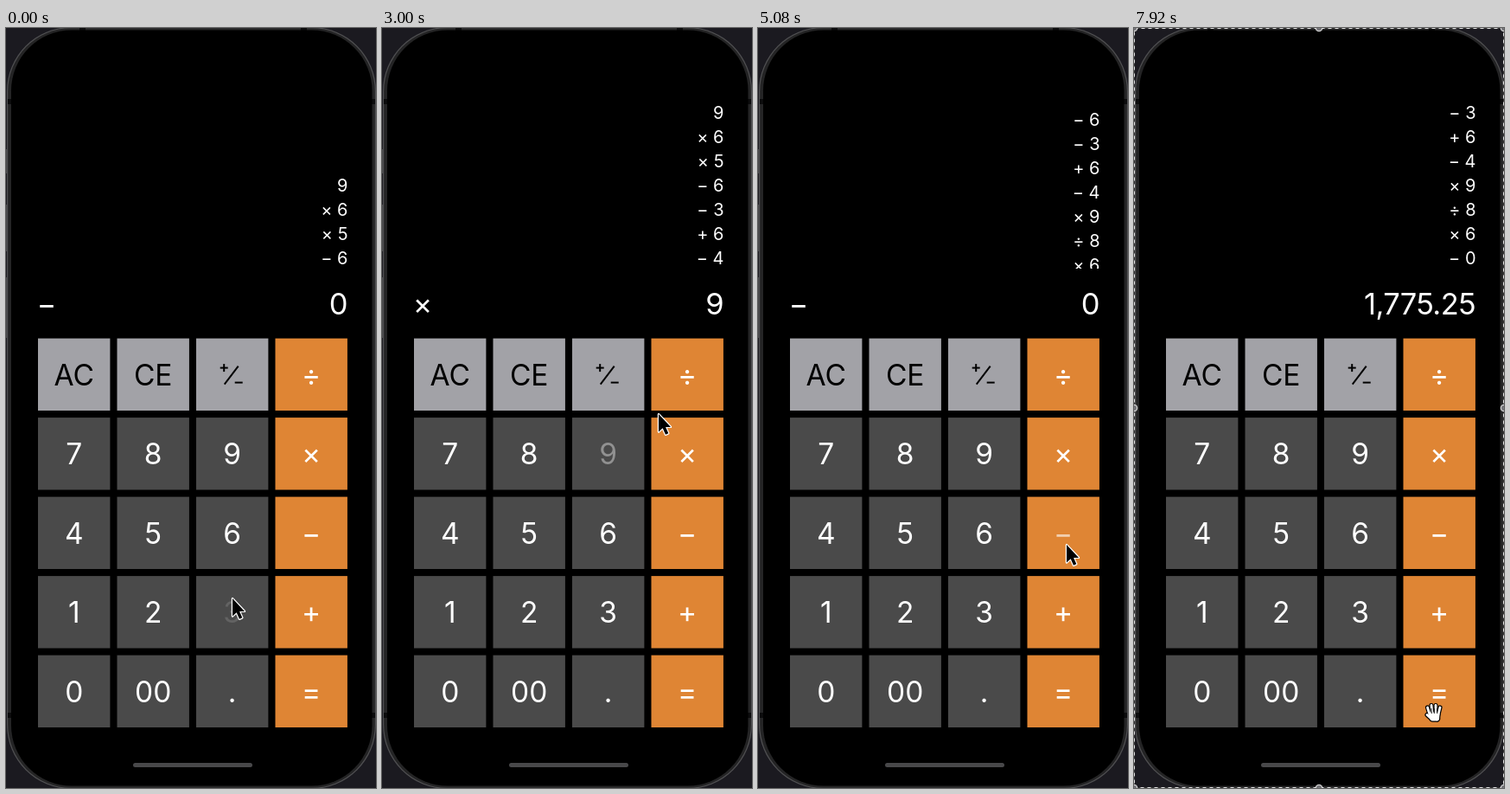
An HTML page with a canvas for the animation above (8010 ms loop, 428 by 878 pixels).

```html
<!DOCTYPE html>
<html lang="en">
<head>
<meta charset="utf-8">
<title>Calculator</title>
<style>
  html, body { margin: 0; width: 100%; height: 100%; overflow: hidden; background: #000; }
  canvas { display: block; }
</style>
</head>
<body>
<canvas id="stage" width="428" height="878"></canvas>
<script>
const W = 428, H = 878, LOOP = 8010, FRAME = 1000 / 12;
const ctx = document.getElementById('stage').getContext('2d');
const FONT = 'Inter, "Noto Sans", sans-serif';
const GRAY = '#a2a2a7', DARK = '#4a4a4a', ORANGE = '#df8534';
const KEYS = [
  ['AC', 'CE', '±', '÷'],
  ['7', '8', '9', '×'],
  ['4', '5', '6', '−'],
  ['1', '2', '3', '+'],
  ['0', '00', '.', '='],
];

// Release time of each key press.
const PRESSES = [
  [70, '3'], [520, '+'], [960, '6'], [1210, '−'], [1640, '4'], [2360, '×'], [2880, '9'],
  [3260, '÷'], [3660, '8'], [4130, '×'], [4520, '6'], [4865, '−'], [5420, '0'], [5740, '='],
];
const HOLD = 90, FADE = 400, DIM = 0.14, SCROLL = 340, ROW = 28, VISIBLE_ROWS = 7;

// Pointer path: time, x, y.
const PATH = [
  [0, 262, 659], [120, 262, 659], [420, 350, 655], [800, 350, 655], [950, 270, 595],
  [1000, 270, 595], [1130, 345, 590], [1240, 345, 590], [1420, 197, 585], [1570, 85, 592],
  [1720, 85, 592], [2080, 393, 652], [2300, 365, 500], [2440, 365, 500], [2720, 264, 500],
  [2890, 266, 500], [3000, 320, 446], [3140, 352, 412], [3300, 352, 412], [3570, 172, 505],
  [3720, 172, 505], [4000, 355, 500], [4170, 355, 500], [4330, 284, 595], [4430, 264, 597],
  [4560, 264, 597], [4750, 357, 597], [5090, 357, 597], [5330, 82, 780], [5470, 82, 780],
  [5700, 345, 783], [LOOP, 345, 783],
];

const clamp = v => Math.max(0, Math.min(1, v));
const smooth = v => v * v * (3 - 2 * v);

function calculatorAt(t) {
  const state = { rows: ['9', '× 6', '× 5', '− 6'], op: '−', shown: '0', scroll: 0 };
  const apply = {
    '+': (a, b) => a + b, '−': (a, b) => a - b, '×': (a, b) => a * b, '÷': (a, b) => a / b,
  };
  let total = 9 * 6 * 5 - 6;
  for (const [time, key] of PRESSES) {
    if (t < time) break;
    if (/\d/.test(key)) { state.shown = key; continue; }
    total = apply[state.op](total, +state.shown);
    state.rows.push(`${state.op} ${state.shown}`);
    state.op = key === '=' ? '' : key;
    state.shown = key === '=' ? total.toLocaleString('en-US') : '0';
    state.scroll = state.rows.length > VISIBLE_ROWS
      ? ROW * (1 - smooth(clamp((t - time) / SCROLL))) : 0;
  }
  return state;
}

function keyAlpha(key, t) {
  let alpha = 1;
  for (const [time, pressed] of PRESSES) {
    if (pressed === key && t >= time - HOLD) {
      alpha = DIM + (1 - DIM) * clamp((t - time) / FADE);
    }
  }
  return alpha;
}

function pointerAt(t) {
  const i = Math.max(1, PATH.findIndex(p => p[0] >= t));
  const [t0, x0, y0] = PATH[i - 1], [t1, x1, y1] = PATH[i];
  const p = smooth((t - t0) / (t1 - t0));
  return [x0 + (x1 - x0) * p, y0 + (y1 - y0) * p];
}

function text(str, x, y, size, align, color = '#fff') {
  ctx.font = `400 ${size}px ${FONT}`;
  ctx.textAlign = align;
  ctx.fillStyle = color;
  ctx.fillText(str, x, y);
}

function fillRound(x, y, w, h, r, color) {
  ctx.fillStyle = color;
  ctx.beginPath();
  ctx.roundRect(x, y, w, h, r);
  ctx.fill();
}

function line(points, color, width) {
  ctx.strokeStyle = color;
  ctx.lineWidth = width;
  ctx.beginPath();
  points.forEach(([x, y]) => ctx.lineTo(x, y));
  ctx.stroke();
}

function drawPhone() {
  ctx.fillStyle = '#1b1a20';
  ctx.fillRect(0, 0, W, H);
  ctx.fillStyle = '#48484a';
  for (const [y, h] of [[140, 28], [204, 54], [288, 70]]) ctx.fillRect(0, y, 1, h);
  fillRound(1, -1, 427, 880, 74, '#505052');
  fillRound(2.2, 0.2, 424.6, 877.6, 73, '#242425');
  ctx.fillStyle = '#0c0c0d';
  for (const y of [82, 791]) {
    ctx.fillRect(2, y, 4, 6);
    ctx.fillRect(423, y, 4, 6);
  }
  for (const x of [85, 341]) ctx.fillRect(x, 0, 7, 3);
  fillRound(6, 2.5, 417.5, 873, 70, '#000');
  fillRound(147, 849, 138, 5, 2.5, '#48484a');
}

function drawDisplay({ rows, op, shown, scroll }) {
  ctx.save();
  ctx.beginPath();
  ctx.rect(30, 85, 370, 193);
  ctx.clip();
  rows.forEach((row, i) => {
    text(row, 395.5, 273.3 - (rows.length - 1 - i) * ROW + scroll, 20, 'right');
  });
  ctx.restore();
  text(op, 47, 331, 34, 'center');
  ctx.letterSpacing = '-0.6px';
  text(shown, 395, 331, 34.5, 'right');
  ctx.letterSpacing = '0px';
}

function drawSignKey(x, y) {
  ctx.lineCap = 'butt';
  line([[x - 14, y - 8], [x - 5, y - 8]], '#000', 2);
  line([[x - 9.5, y - 12.5], [x - 9.5, y - 3.5]], '#000', 2);
  line([[x - 9, y + 11], [x + 7, y - 10]], '#000', 2);
  line([[x + 3, y + 9], [x + 12, y + 9]], '#000', 2);
}

function drawKeys(t) {
  KEYS.forEach((keys, row) => keys.forEach((key, col) => {
    const x = 37 + col * 91.5, y = 358.6 + row * 91.5, size = 83.4;
    const light = row === 0 && col < 3;
    ctx.fillStyle = col === 3 ? ORANGE : light ? GRAY : DARK;
    ctx.fillRect(x, y, size, size);
    ctx.globalAlpha = keyAlpha(key, t);
    const cx = x + size / 2;
    if (key === '±') drawSignKey(cx, y + 42);
    else text(key, cx, y + 54.2, 33.5, 'center', light ? '#000' : '#fff');
    ctx.globalAlpha = 1;
  }));
}

function drawArrow(x, y) {
  const arrow = new Path2D('M0 0V20.5L4.7 16.2L8 23.8L11.3 22.3L8.1 14.9H14Z');
  ctx.save();
  ctx.translate(x, y);
  ctx.lineJoin = 'round';
  ctx.lineWidth = 2.4;
  ctx.strokeStyle = '#fff';
  ctx.stroke(arrow);
  ctx.fillStyle = '#000';
  ctx.fill(arrow);
  ctx.restore();
}

function drawHand(x, y) {
  const fingers = [
    [[5, 13], [2.5, 5]], [[8, 12], [7, 2.5]], [[12, 12], [12, 2.5]],
    [[15, 13], [17, 5]], [[7, 18], [2, 13.5]],
  ];
  const palm = [[6.5, 13], [14, 13], [13.5, 18], [8, 18]];
  ctx.save();
  ctx.translate(x, y);
  ctx.lineCap = ctx.lineJoin = 'round';
  for (const [color, extra] of [['#000', 2.4], ['#fff', 0]]) {
    fingers.forEach(f => line(f, color, 2.8 + extra));
    line([...palm, palm[0], palm[2]], color, 5 + extra);
  }
  ctx.lineCap = 'butt';
  for (const fx of [7, 10, 13.5]) line([[fx, 6], [fx + 0.3, 12]], '#000', 0.9);
  ctx.restore();
}

function drawSelection() {
  ctx.lineWidth = 1;
  ctx.strokeStyle = '#333';
  ctx.strokeRect(0.5, 0.5, W - 1, H - 1);
  ctx.setLineDash([4, 4]);
  ctx.strokeStyle = '#ddd';
  ctx.strokeRect(0.5, 0.5, W - 1, H - 1);
  ctx.setLineDash([]);
  for (const x of [0, W / 2, W]) for (const y of [0, H / 2, H]) {
    if (x === W / 2 && y === H / 2) continue;
    ctx.beginPath();
    ctx.arc(x, y, 3.8, 0, 7);
    ctx.fillStyle = '#77777b';
    ctx.fill();
    ctx.strokeStyle = '#eee';
    ctx.stroke();
  }
}

function draw(now) {
  const step = Math.min(95, Math.floor((now % LOOP + 4) / FRAME));
  const t = step * FRAME;
  drawPhone();
  drawDisplay(calculatorAt(t));
  drawKeys(t);
  if (step >= 94) drawSelection();
  if (step === 95) drawHand(337, 780);
  else drawArrow(...pointerAt(t));
  requestAnimationFrame(draw);
}

requestAnimationFrame(draw);
</script>
</body>
</html>
```
